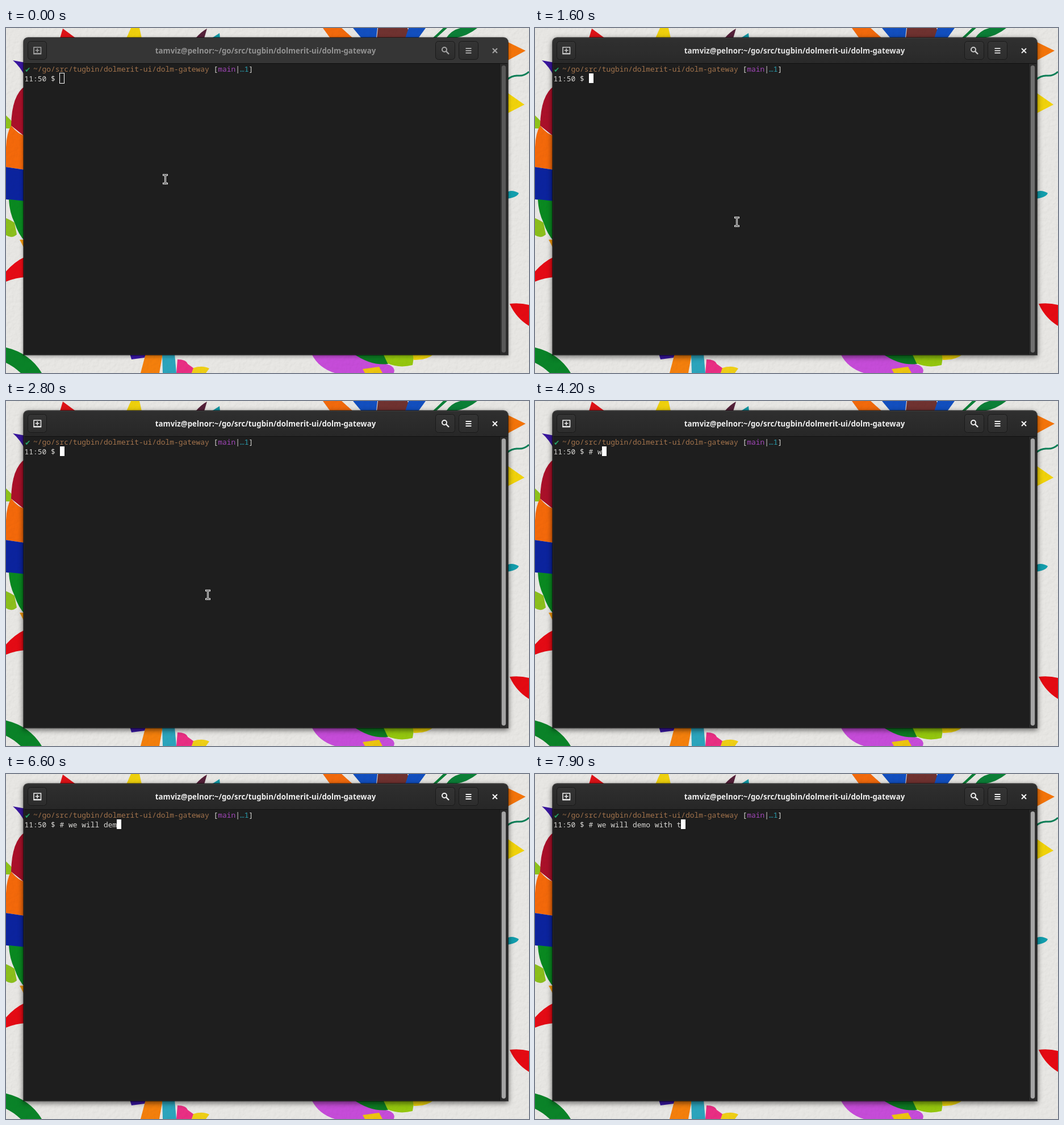
An HTML page for the animation above (8000 ms loop, 921 by 608 pixels).

```html
<!DOCTYPE html>
<html lang="en">
<head>
<meta charset="utf-8">
<title>Terminal</title>
<style>
  html, body { margin: 0; width: 100%; height: 100%; overflow: hidden; background: #e5e4e1; }
  svg, #shade { position: absolute; }
  svg { left: 0; top: 0; width: 921px; height: 608px; }
  #wall { will-change: transform; }
  #shade { left: 31px; top: 17px; width: 853px; height: 559px; border-radius: 8px 8px 0 0; }
  text { white-space: pre; }
  .mono { font: 12.92px "Noto Sans Mono", "DejaVu Sans Mono", monospace; fill: #d8d7d4; }
  #title { font: 700 13.3px "Noto Sans", "Open Sans", sans-serif; text-anchor: middle; }
  .line { fill: none; stroke: currentColor; stroke-width: 2; }
</style>
</head>
<body>
<svg id="wall" viewBox="0 0 921 608">
  <defs>
    <filter id="plaster" x="0" y="0" width="100%" height="100%">
      <feTurbulence type="fractalNoise" baseFrequency=".16" numOctaves="3" seed="7"/>
      <feDiffuseLighting surfaceScale="1.1" lighting-color="#fff">
        <feDistantLight azimuth="225" elevation="62"/>
      </feDiffuseLighting>
    </filter>
  </defs>
  <rect width="921" height="608" fill="#e9e8e5"/>
  <g id="paint"></g>
  <rect width="921" height="608" filter="url(#plaster)" opacity=".22" style="mix-blend-mode:multiply"/>
</svg>

<div id="shade"></div>

<svg viewBox="0 0 921 608">
  <defs>
    <linearGradient id="bar" x2="0" y2="1">
      <stop stop-color="#2f2f2f"/><stop offset="1" stop-color="#272727"/>
    </linearGradient>
    <linearGradient id="key" x2="0" y2="1">
      <stop stop-color="#343434"/><stop offset="1" stop-color="#2d2d2d"/>
    </linearGradient>
    <path id="head" d="M31 62V25Q31 17 39 17H876Q884 17 884 25V62Z"/>
    <path id="beam" d="M-3 -7.5H-1Q0 -7.5 0 -6.5Q0 -7.5 1 -7.5H3M0 -6.5V6.5M-3 7.5H-1Q0 7.5 0 6.5Q0 7.5 1 7.5H3"/>
  </defs>

  <rect x="31" y="62" width="853" height="514" fill="#1e1e1e"/>
  <use href="#head" fill="url(#bar)"/>
  <path d="M38 17.5H877" stroke="#3f3f3f"/>
  <g id="dim">
    <use href="#head" fill="#353535"/>
  </g>
  <path d="M31 62.5H884" stroke="#101010"/>
  <path d="M31.5 62V575.5H883.5V62" fill="none" stroke="#292929"/>

  <g fill="url(#key)" stroke="#1a1a1a">
    <rect x="38.5" y="23.5" width="33" height="32" rx="5"/>
    <rect x="756.5" y="23.5" width="34" height="32" rx="5"/>
    <rect x="797.5" y="23.5" width="34" height="32" rx="5"/>
  </g>

  <g id="icons">
    <path class="line" style="stroke-width:1.5" d="M49 34H61.5V45H49ZM55.2 36V43M51.7 39.5H58.7"/>
    <path class="line" d="M48.3 45.5H62.2"/>
    <circle class="line" cx="772" cy="38" r="4"/>
    <path class="line" style="stroke-width:2.4" d="M775 41L780 46"/>
    <path class="line" d="M809.5 36H819.5M809.5 40H819.5M809.5 44H819.5"/>
  </g>
  <path id="close" class="line" d="M857 36L865 44M865 36L857 44"/>
  <text id="title" x="457" y="45">tamviz@pelnor:~/go/src/tugbin/dolmerit-ui/dolm-gateway</text>

  <rect x="870" y="63" width="13.5" height="512.5" fill="#2a2a2a"/>
  <path d="M869.5 63V575.5" stroke="#181818"/>
  <rect id="slider" x="872.8" y="66" width="7.4" height="506" rx="3.7"/>

  <text x="33" y="77.5" style="font:12.5px 'DejaVu Sans',sans-serif" fill="#26a269">✔</text>
  <text class="mono" x="48.1" y="77.3"><tspan fill="#a2734c">~/go/src/tugbin/dolmerit-ui/dolm-gateway</tspan> [<tspan fill="#a347ba">main</tspan>|<tspan fill="#2aa1b3">…1</tspan>]</text>
  <text class="mono" x="32.6" y="93.8">11:50 $ <tspan id="typed"></tspan></text>
  <rect id="caret" y="80" height="17"/>

  <g id="pointer" fill="none" stroke-linecap="square">
    <use href="#beam" stroke="#fff" stroke-width="3"/>
    <use href="#beam" stroke="#111" stroke-width="1"/>
  </g>
</svg>

<script>
const $ = id => document.getElementById(id);
const LOOP = 8000, CELL = 7.752, LINE_START = 94.7;
const COMMENT = "# we will demo with t";
const KEY_TIMES = [3500, 3700, 4200, 4400, 4500, 4800, 5000, 5300, 5400, 5500, 5900,
  6100, 6600, 6800, 6900, 7100, 7200, 7400, 7500, 7600, 7900];

// Painted mural fragments that show around the window.
const PAINT = [
  ["#e01217", "M100 1L123 18H95Z"],
  ["#f0d20c", "M220 0H235L239 18H212Z"],
  ["#542039", "M354 1L349 18H334Q343 7 354 1Z"],
  ["#0f98a5", "M376 9L377 18H362Z"],
  ["#f36a0c", "M558 0H591L611 18H571Z"],
  ["#124fc0", "M611 0H654L652 18H626Z"],
  ["#703230", "M655 0H707Q711 8 703 18H653Z"],
  ["#124fc0", "M709 0H739L726 18H703Z"],
  ["#0b8037", "M770 0H777L757 18H751ZM775 18Q784 4 800 0H830Q813 14 790 18Z"],
  ["#f5750a", "M880 23L915 40L880 59Z"],
  ["#f2d40a", "M880 112L913 135L880 152Z"],
  ["#129fae", "M880 291Q889 283 903 291Q900 299 880 301Z"],
  ["#e60a12", "M887 486Q905 484 921 488V525Q898 511 887 486Z"],
  ["#3a16a0", "M12 57L34 61V86Q25 68 12 57Z"],
  ["#8fc41a", "M0 154L10 164V177H0Z"],
  ["#ab1029", "M34 102Q10 118 9 172L34 192Z"],
  ["#f5690a", "M9 172Q22 188 34 190V250L0 245V210Q1 185 9 172Z"],
  ["#0b239f", "M0 245L34 250V306L0 302Z"],
  ["#098a20", "M5 302L34 305V376Q22 365 15 343Q6 325 5 302Z"],
  ["#8cc01c", "M0 335Q9 339 15 343L19 364Q10 372 0 365Z"],
  ["#f59a0c", "M24 373H34V392Z"],
  ["#e60a14", "M0 429Q16 411 34 403V439Q17 440 0 447Z"],
  ["#0a8428", "M0 563Q42 573 63 608H26Q13 596 0 590Z"],
  ["#3a16a8", "M218 574H247L244 581L221 584Z"],
  ["#f5800c", "M246 574H276L270 608H237Z"],
  ["#2ba5bd", "M275 574H297L300 608H276Z"],
  ["#ea2e84", "M302 584Q317 584 320 592L331 600L327 608H300Z"],
  ["#f0d016", "M330 599Q346 594 358 600L352 608H327Z"],
  ["#c74cda", "M538 574H620Q638 589 669 592Q687 596 683 608H579Q550 599 538 574Z"],
  ["#0c7a22", "M612 574H668L673 592Q643 596 612 574Z"],
  ["#95c80e", "M664 574H719L716 594Q692 600 672 591Z"],
  ["#f0d60a", "M716 574H754Q741 586 718 585Z"],
  ["#eec60f", "M628 601L657 597L663 608H632Z"]
];
$("paint").innerHTML = PAINT.map(([c, d]) => `<path fill="${c}" d="${d}"/>`).join("") +
  '<path d="M882 91Q892 83 902 84T921 77" fill="none" stroke="#0c8058" stroke-width="3"/>';

const mix = (a, b, k) => a + (b - a) * k;
const grey = (a, b, k) => `rgb(${Array(3).fill(Math.round(mix(a, b, k)))})`;
const clamp = k => Math.max(0, Math.min(1, k));
const smooth = k => k * k * (3 - 2 * k);

function draw(ms) {
  const t = Math.floor(ms / 100) * 100;
  const focused = t >= 1600;
  const focus = !focused ? 0 : t < 1700 ? .85 : 1;

  $("dim").setAttribute("opacity", 1 - focus);
  $("title").style.fill = grey(146, 238, focus);
  $("icons").style.color = grey(165, 240, focused ? clamp((t - 1500) / 200) : 0);
  $("close").style.color = grey(165, 248, focus);
  $("slider").style.fill = grey(88, 164, [.3, .78, 1][Math.min(2, (t - 1600) / 100)] || 0);
  $("shade").style.boxShadow =
    `0 ${mix(2, 3, focus)}px ${mix(6, 10, focus)}px 1px rgba(0,0,0,${mix(.32, .55, focus)}), 0 0 0 1px rgba(0,0,0,.55)`;

  const move = smooth(clamp((t - 800) / 700));
  $("pointer").setAttribute("transform", `translate(${mix(280.5, 355.5, move)} ${mix(266.5, 341.5, move)})`);
  $("pointer").setAttribute("visibility", t < 3500 ? "visible" : "hidden");

  const count = KEY_TIMES.filter(k => k <= t).length;
  $("typed").textContent = COMMENT.slice(0, count);

  const caret = $("caret");
  const x = LINE_START + count * CELL;
  const set = (left, top, w, h, fill, stroke) => Object.entries({ x: left, y: top, width: w, height: h, fill, stroke })
    .forEach(([name, value]) => caret.setAttribute(name, value));
  if (focused) set(Math.round(x), 80, 8, 17, "#fff", "none");
  else set(94.5, 79.5, 8, 18, "none", "#fff");
  caret.setAttribute("visibility", t >= 2200 && t < 2800 ? "hidden" : "visible");
}

const start = performance.now();
function tick() {
  draw((performance.now() - start) % LOOP);
  requestAnimationFrame(tick);
}
tick();
</script>
</body>
</html>
```
